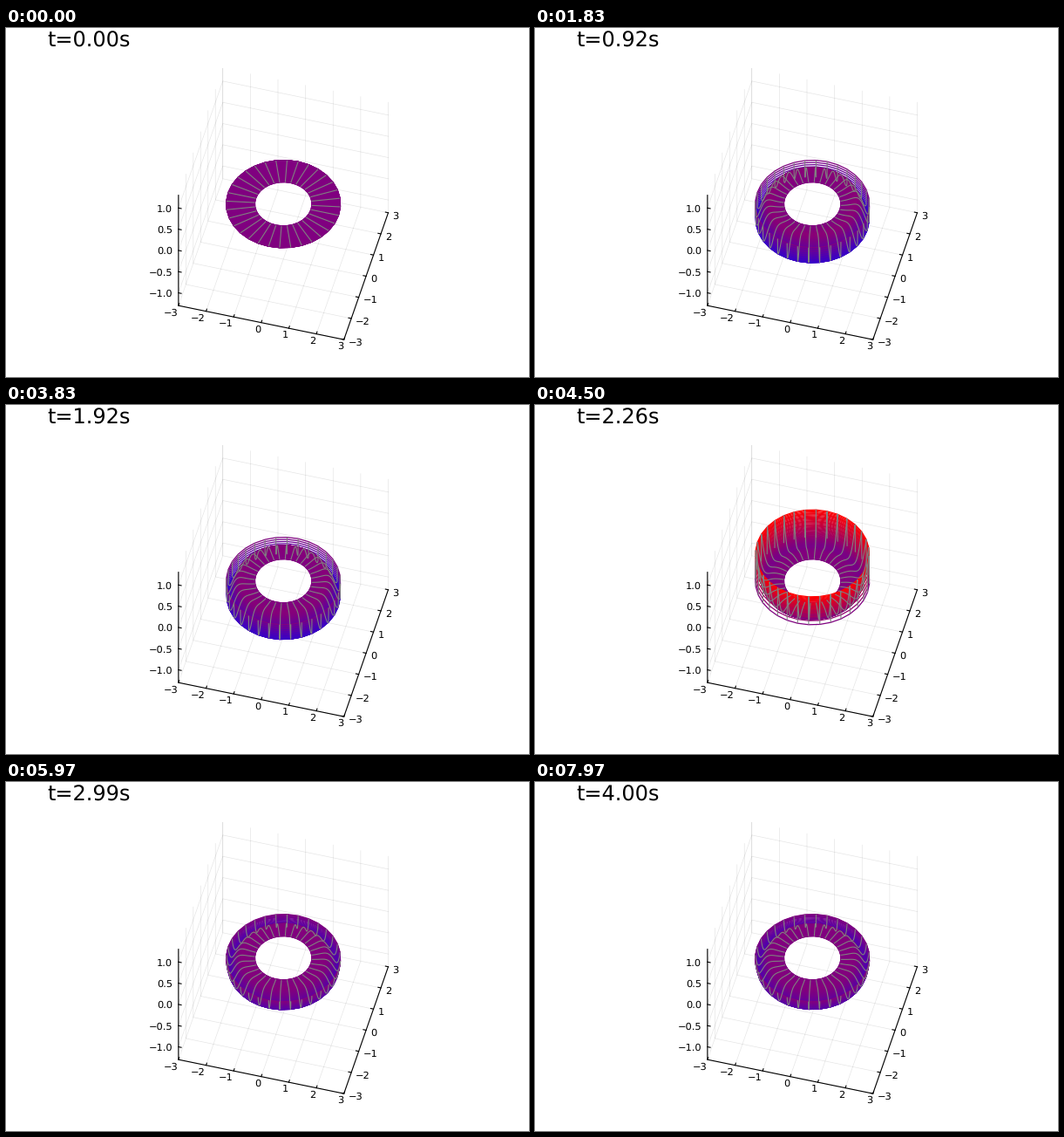
A matplotlib script that plays this animation: 600 by 400 pixels, repeating every 8 s.

```python
import numpy as np
import matplotlib.pyplot as plt
from matplotlib.animation import FuncAnimation
from matplotlib.collections import LineCollection

W, H, DPI = 600, 400, 100
STEPS, FRAMES, INTERVAL = 240, 320, 25
DT = 5 / 299

# Orthographic camera
AZ, EL = np.radians(15), np.radians(50)
CENTER, SCALE, ZSCALE = (318.2, 201.7), 32.75, 48.65
LIM, ZLIM = 3, 1.3

# Viscous ring driven at its outer edge, with a rim clamped at zero
NU, AMP, FREQ = 0.07, 0.695, 1.0
CELLS, SUBSTEPS, SPOKES = 200, 6, 32
RIM_CELLS, RIM_RINGS = 2, 7


def project(x, y, z):
    px = CENTER[0] + SCALE * (x * np.cos(AZ) + y * np.sin(AZ))
    depth = y * np.cos(AZ) - x * np.sin(AZ)
    py = CENTER[1] - SCALE * np.sin(EL) * depth - ZSCALE * z
    return np.stack(np.broadcast_arrays(px, py), axis=-1)


def solve():
    """Implicit diffusion from rest: u_t = nu (u_rr + u_r / r)."""
    r = np.linspace(1, 2, CELLS + 1)
    h, dt = r[1] - r[0], DT / SUBSTEPS
    step = np.eye(CELLS + 1)
    for i in range(1, CELLS):
        step[i, i - 1] -= NU * dt * (1 / h**2 - 0.5 / (h * r[i]))
        step[i, i] += 2 * NU * dt / h**2
        step[i, i + 1] -= NU * dt * (1 / h**2 + 0.5 / (h * r[i]))
    inv = np.linalg.inv(step)
    u = np.zeros(CELLS + 1)
    states = [u]
    for k in range(1, (STEPS - 1) * SUBSTEPS + 1):
        u = u.copy()
        u[0], u[-1] = 0, AMP * np.sin(2 * np.pi * FREQ * k * dt)
        u = inv @ u
        if k % SUBSTEPS == 0:
            states.append(u)
    return r, np.array(states)


def add_rim(values, end):
    inner = values[:-RIM_CELLS]
    return np.concatenate([inner, np.linspace(inner[-1], end, RIM_RINGS + 1)[1:]])


def ring_colors(z):
    s = np.clip(z / 0.65, -1, 1)
    half = 128 / 255
    red = np.where(s > 0, half + (1 - half) * s, half * (1 + s))
    blue = np.where(s < 0, half - (1 - half) * s, half * (1 - s))
    return np.stack([red, 0 * s, blue], axis=-1)


def line(points, **style):
    p = np.array([project(*q) for q in points])
    ax.plot(p[:, 0], p[:, 1], snap=False, **style)


def label(x, y, text, ha):
    ax.text(x, y + 4.2, text, size=8.2, ha=ha, va="baseline")


def draw_axes():
    grid = dict(color="black", alpha=0.1, lw=0.5, zorder=0)
    black = dict(color="black", lw=0.8, zorder=1)
    L, Z = LIM, ZLIM
    for v in range(-L, L + 1):
        name = str(v).replace("-", "\u2212")
        line([(v, -L, -Z), (v, L, -Z), (v, L, Z)], **grid)
        line([(-L, v, Z), (-L, v, -Z), (L, v, -Z)], **grid)
        line([(v, -L, -Z), (v, -L + 0.1, -Z)], **black)
        line([(L, v, -Z), (L - 0.1, v, -Z)], **black)
        px, py = project(v, -L, -Z)
        label(px - 0.6, py + 7, name, "right")
        px, py = project(L, v, -Z)
        label(px + 5, py + 2.5, name, "left")
    for v in np.arange(-1, 1.1, 0.5):
        line([(-L, -L, v), (-L, L, v), (L, L, v)], **grid)
        line([(-L, -L, v), (-L + 0.1, -L, v)], **black)
        px, py = project(-L, -L, v)
        label(px - 6.8, py, f"{v:.1f}".replace("-", "\u2212"), "right")
    line([(-L, -L, Z), (-L, -L, -Z), (L, -L, -Z), (L, L, -Z)], **black)


plt.rcParams["font.family"] = "DejaVu Sans"
plt.rcParams["text.hinting"] = "none"
fig = plt.figure(figsize=(W / DPI, H / DPI), dpi=DPI, facecolor="white")
ax = fig.add_axes([0, 0, 1, 1])
ax.set_xlim(0, W)
ax.set_ylim(H, 0)
ax.axis("off")
draw_axes()

nodes, states = solve()
radii = add_rim(nodes, nodes[-1])[:, None]
angles = np.linspace(0, 2 * np.pi, SPOKES + 1)[None, :] + 2 * np.pi / SPOKES
gx, gy = radii * np.cos(angles), radii * np.sin(angles)
half = SPOKES // 2

back = LineCollection([], linewidths=0.9, zorder=2)
front = LineCollection([], linewidths=0.9, zorder=3)
spokes = LineCollection([], linewidths=0.8, colors="gray", zorder=4)
for lines in (back, front, spokes):
    ax.add_collection(lines, autolim=False)
title = ax.text(47.5, 21.3, "", size=17.3, ha="left", va="baseline")


def update(frame):
    # Three steps per 100 ms on a 25 ms clock
    i = (3 * frame + 2) // 4
    z = add_rim(states[i], 0)
    pts = project(gx, gy, z[:, None])
    colors = ring_colors(z)
    # Far half is painted from the rim inwards, near half outwards
    back.set_segments(pts[::-1, :half + 1])
    back.set_color(colors[::-1])
    front.set_segments(pts[:, half:])
    front.set_color(colors)
    spokes.set_segments(pts.transpose(1, 0, 2)[:-1])
    title.set_text(f"t={i * DT:.2f}s")
    return back, front, spokes, title


anim = FuncAnimation(fig, update, frames=FRAMES, interval=INTERVAL,
                     repeat=True, repeat_delay=0, blit=False)
plt.show()
```
